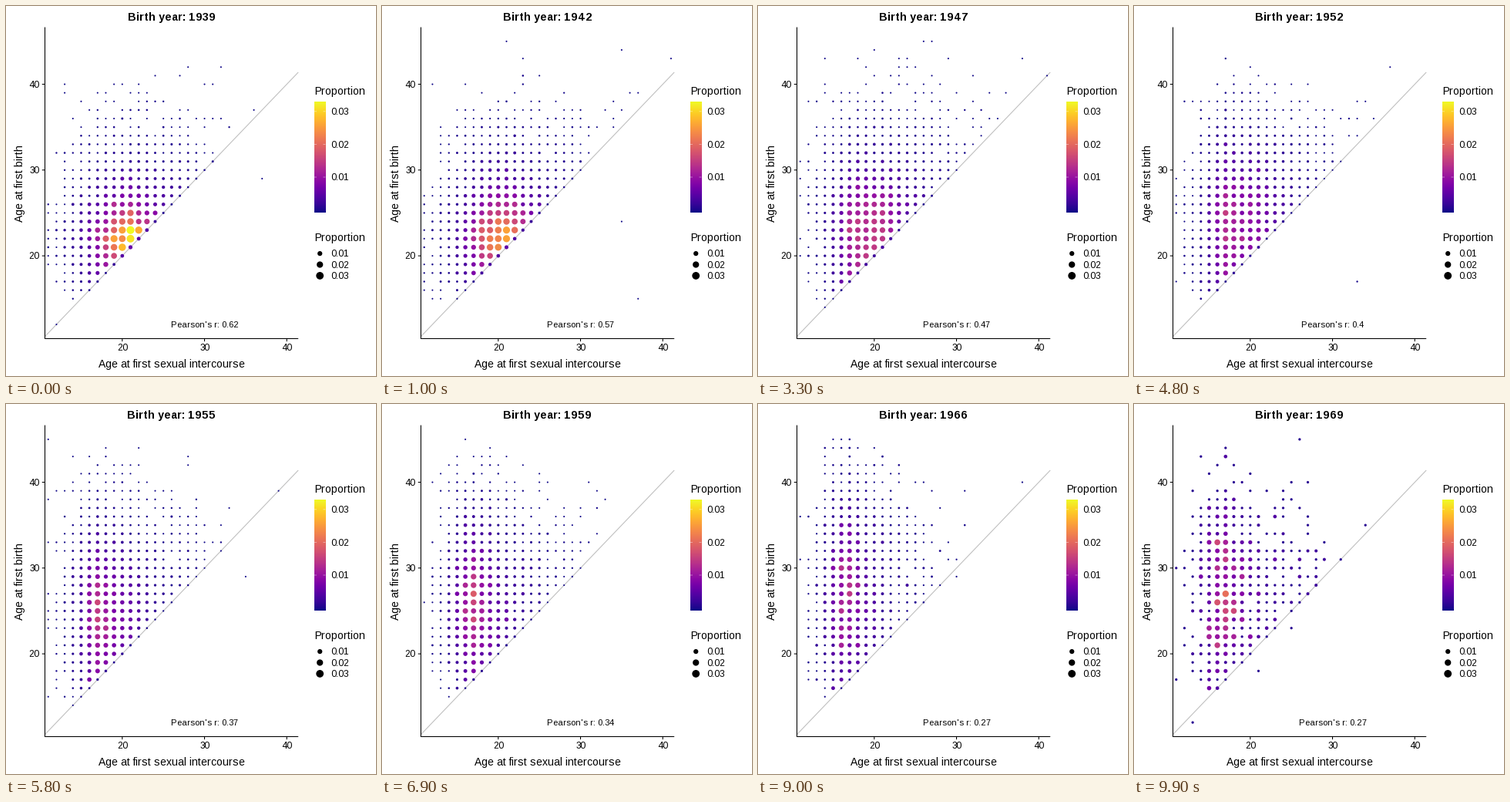
A matplotlib script that plays this animation: 480x480 px, repeating every 10 s.

```python
import numpy as np
import matplotlib.pyplot as plt
from matplotlib.animation import FuncAnimation

plt.rcParams.update({
    "font.family": "Liberation Sans",
    "text.hinting_factor": 1,      # whole-pixel letter spacing
})

SIZE, P_MAX = 480, 0.033
FIRST, LAST = 1939, 1969
LONG_STEPS = 9          # the first transitions take four frames, the rest three
LEFT, RIGHT, TOP, BOTTOM = 50.5, 379.2, 27.5, 431.5
X, Y = np.meshgrid(np.arange(11, 42), np.arange(12, 46), indexing="ij")
R_YEARS = [1939, 1944, 1947, 1952, 1959, 1966, 1969]
R_VALUES = [0.62, 0.54, 0.47, 0.40, 0.34, 0.27, 0.27]
cmap = plt.get_cmap("plasma")


def peak(x, mode, left, right):
    """Skewed bump: soft shoulder on the left, exponential tail on the right."""
    d = x - mode
    return np.where(d < 0, np.exp(-(np.abs(d) / left) ** 1.5),
                    np.exp(-np.abs(d) / right))


def shares(year):
    """Simulated share of each (x, y) cell for one birth year."""
    u = (year - FIRST) / (LAST - FIRST)
    one = np.interp(year, [1939, 1959, 1966, 1969], [0.0002, 0.0002, 0.0003, 0.0015])
    young = np.interp(year, [1939, 1943, 1959, 1969], [0.002, 0.008, 0.016, 0.0125])
    old = 0.031 * (1 - u) ** 3

    # first intercourse: an early group gradually replaces a late one
    column = young * peak(X, 18 - 1.6 * u, 1.9, 2.4) + old * peak(X, 21, 3.8, 3.2)

    # first birth: later and more spread out, with a bump soon after the start
    lag = Y - X
    spread = np.exp(-(np.abs(Y - 22 - 5.5 * u) / (4 + 5.5 * u)) ** (1.3 + 0.7 * u))
    soon = (0.1 + 0.6 * np.exp(-((year - 1949) / 6) ** 2)) * np.exp(-lag.clip(0) / 3)
    adult = 1 / (1 + np.exp(3 * (15.3 - Y)))
    p = column * np.minimum(spread + soon, 1) * adult * np.where(lag == 0, 0.2, 1)

    # thin background and a few strays
    haze = np.exp(-((X - 22) / 8) ** 4 - ((Y - 26) / 10) ** 4)
    p = p + one * (2.5 * (1 - 0.6 * u) * haze + 0.012)
    p = np.where(lag < 0, 0.003 * one, p)
    rng = np.random.default_rng(year)
    return np.minimum(rng.poisson(p / one) * one, P_MAX)


def px(x):
    return LEFT + (x - 10.6) * (RIGHT - LEFT) / 30.8


def py(y):
    return BOTTOM - (y - 10.35) * (BOTTOM - TOP) / 36.3


def diameter(p):
    return 1.4 + 8.8 * np.sqrt(p / P_MAX)


states = [shares(y) for y in range(FIRST, LAST + 1)]

fig = plt.figure(figsize=(SIZE / 72, SIZE / 72), dpi=72, facecolor="white")
ax = fig.add_axes([0, 0, 1, 1])
ax.axis("off")


def line(xs, ys, color="black", lw=1.07, **kw):
    ax.plot(xs, ys, color=color, lw=lw, solid_capstyle="butt", snap=False, **kw)


def label(x, y, s, size, ha="left", **kw):
    return ax.text(x, y, s, fontsize=size, ha=ha, va="baseline", **kw)


ends = np.array([10.6, 41.4])
line(px(ends), py(ends), "#bebebe", zorder=1)
line([LEFT, LEFT], [TOP, BOTTOM + 0.5], zorder=3)
line([LEFT - 0.5, RIGHT], [BOTTOM, BOTTOM], zorder=3)
for v in (20, 30, 40):
    line([px(v)] * 2, [BOTTOM, BOTTOM + 3.7])
    line([LEFT - 3.7, LEFT], [py(v)] * 2)
    label(px(v), 447, str(v), 12, "center")
    label(43.5, py(v) + 4.3, str(v), 12, "right")
label(215, 469, "Age at first sexual intercourse", 14, "center")
label(22, 229.5, "Age at first birth", 14, "center", rotation=90,
      rotation_mode="anchor")

label(400, 115, "Proportion", 14)
ax.imshow(np.linspace(0, 1, 256)[:, None], cmap=cmap, origin="lower",
          extent=(400, 414.5, 267.6, 123.8), aspect="auto")
label(400, 305, "Proportion", 14)
steps = np.array([1, 2, 3])
rows = 306.7 + 14.4 * steps
ax.scatter([407.2] * 3, rows, s=diameter(steps / 100) ** 2, c="black", lw=0)
for n, row in zip(steps, rows):
    y = 264.6 - 42.6 * n
    for x in (400, 411.5):
        line([x, x + 2.9], [y, y], "white", 0.7, alpha=0.6)
    for base in (y, row):
        label(421, base + 4.3, f"0.0{n}", 12)

title = label(214.7, 19, "", 14, "center", weight="bold")
note = label(257.6, 417, "", 11, "center")
dots = ax.scatter([], [], lw=0, zorder=2)
ax.set_xlim(0, SIZE)
ax.set_ylim(SIZE, 0)


def timeline(i):
    """State index and progress toward the next state."""
    if i < 4 * LONG_STEPS:
        return i // 4, i % 4 / 4
    k, rest = divmod(i - 4 * LONG_STEPS, 3)
    return LONG_STEPS + k, rest / 3


def draw(i):
    k, t = timeline(i)
    a, b = states[k], states[min(k + 1, len(states) - 1)]
    on = a > 0
    pa = a[on]
    pb = np.where(b[on] > 0, b[on], pa)
    dots.set_offsets(np.c_[px(X[on]), py(Y[on])])
    dots.set_sizes(((1 - t) * diameter(pa) + t * diameter(pb)) ** 2)
    dots.set_facecolor((1 - t) * cmap(pa / P_MAX) + t * cmap(pb / P_MAX))
    year = FIRST + k + (t >= 0.5)
    r = round(float(np.interp(year, R_YEARS, R_VALUES)), 2)
    title.set_text(f"Birth year: {year}")
    note.set_text(f"Pearson's r: {r:g}")
    return dots, title, note


anim = FuncAnimation(fig, draw, frames=100, interval=100, repeat=True)
plt.show()
```
